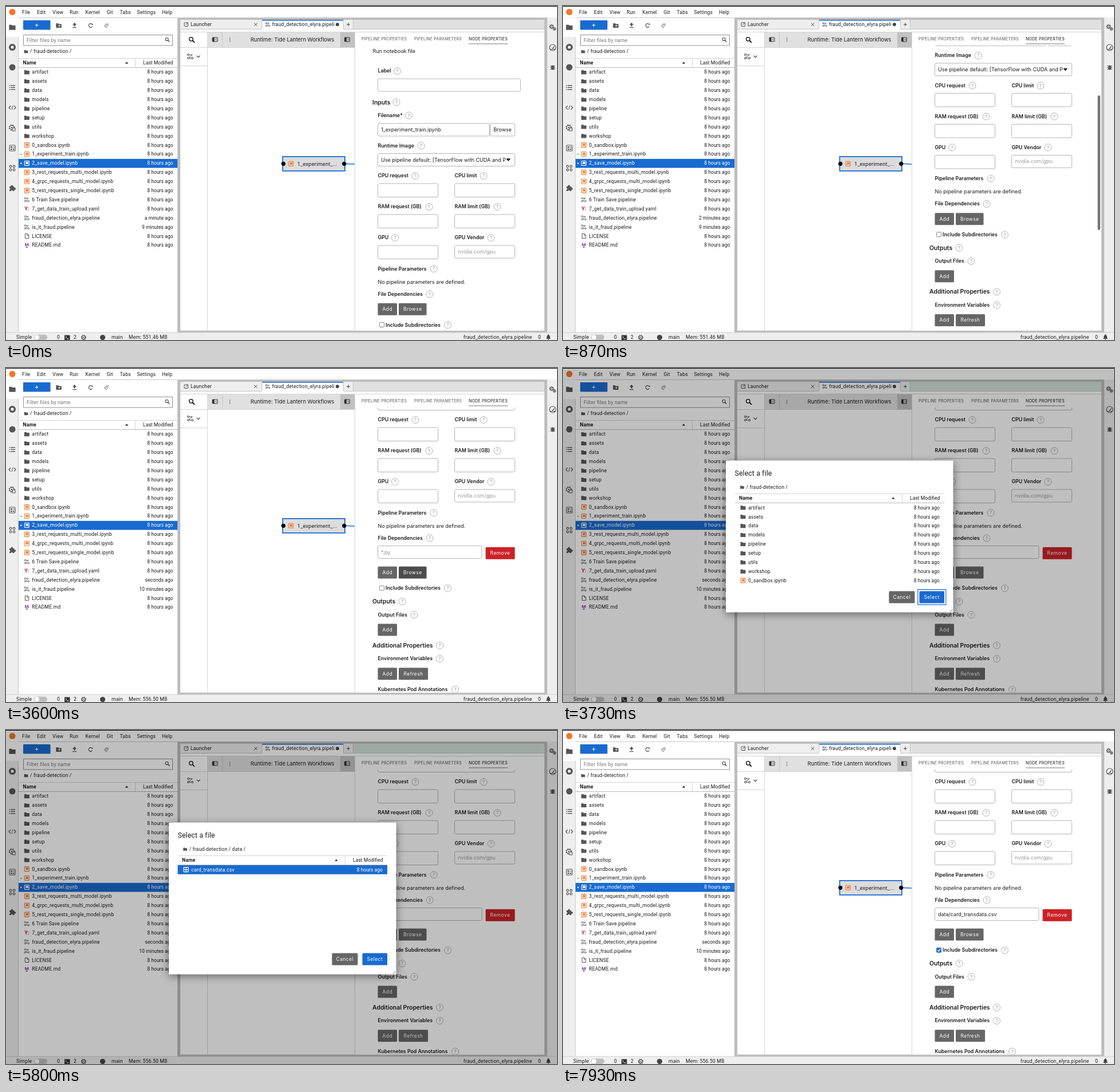
Write an HTML page with a canvas that moves like this. It is 961 px wide and 583 px high and loops after 8 s.

```html
<!DOCTYPE html>
<html lang="en">
<head>
<meta charset="utf-8">
<title>Pipeline editor</title>
<style>
html, body { margin: 0; width: 100%; height: 100%; overflow: hidden; background: #fff; }
canvas { display: block; width: 961px; height: 583px; }
</style>
</head>
<body>
<canvas id="stage"></canvas>
<script>
const W = 961, H = 583, LOOP = 8000, ROW = 15.895;
const canvas = document.getElementById('stage');
const c = canvas.getContext('2d');
const dpr = window.devicePixelRatio || 1;
canvas.width = W * dpr;
canvas.height = H * dpr;

const BLUE = '#196bd0', ORANGE = '#f37726', INK = '#1c1c1c', ICON = '#555', LINE = '#d4d4d4';
const GREY = '#666', DARK = '#4c4c4c';
const UI = { size: 8.6, face: 'Roboto', gap: 0.16 };
const DATE = { ...UI, gap: 0, align: 'right' };
const HEAD = { ...UI, weight: 700 };
const FORM = { size: 9, face: 'Inter' };
const LABEL = { size: 8.8, face: 'Inter', weight: 600 };
const TITLE = { size: 10.4, face: 'Inter', weight: 600 };
const TAB = { size: 7, face: 'Inter', gap: 0.23 };
const BTN = { size: 8.4, face: 'Inter', gap: 0.5, align: 'center' };

function text(s, x, y, style = UI, color = INK) {
  c.font = `${style.weight || 400} ${style.size}px ${style.face}, sans-serif`;
  c.letterSpacing = (style.gap || 0) + 'px';
  c.textAlign = style.align || 'left';
  c.fillStyle = color;
  c.fillText(s, x, y + style.size * 0.34);
}
function rect(x, y, w, h, color) {
  c.fillStyle = color;
  c.fillRect(x, y, w, h);
}
function box(x, y, w, h, r, fill, stroke, lw = 1) {
  c.beginPath();
  c.roundRect(x, y, w, h, r);
  if (fill) { c.fillStyle = fill; c.fill(); }
  if (stroke) { c.strokeStyle = stroke; c.lineWidth = lw; c.stroke(); }
}
function line(color, lw, ...p) {
  c.beginPath();
  for (let i = 0; i < p.length; i += 2) c.lineTo(p[i], p[i + 1]);
  c.strokeStyle = color;
  c.lineWidth = lw;
  c.stroke();
}
function poly(color, ...p) {
  c.beginPath();
  for (let i = 0; i < p.length; i += 2) c.lineTo(p[i], p[i + 1]);
  c.fillStyle = color;
  c.fill();
}
function disc(x, y, r, color) {
  c.beginPath();
  c.arc(x, y, r, 0, 7);
  c.fillStyle = color;
  c.fill();
}
function ring(x, y, r, color, lw = 1, from = 0, to = Math.PI * 2) {
  c.beginPath();
  c.arc(x, y, r, from, to);
  c.strokeStyle = color;
  c.lineWidth = lw;
  c.stroke();
}
// Last value whose start time has passed.
function step(t, list) {
  let v = list[0][1];
  for (const [start, value] of list) if (t >= start) v = value;
  return v;
}

// Icons, each centred on x, y
function folder(x, y, k = 1, color = ICON) {
  poly(color, x - 4.5 * k, y - 3.5 * k, x - 1 * k, y - 3.5 * k, x, y - 2.4 * k,
    x + 4.5 * k, y - 2.4 * k, x + 4.5 * k, y + 3.7 * k, x - 4.5 * k, y + 3.7 * k);
}
function notebook(x, y, color = ORANGE) {
  box(x - 4, y - 4, 8, 8, 0.8, null, color, 1.1);
  poly(color, x - 1.8, y - 2.4, x + 2.4, y - 2.4, x + 2.4, y + 2.6, x + 0.3, y + 0.8, x - 1.8, y + 2.6);
}
function flow(x, y, k = 1, color = ICON) {
  line(color, 0.9, x - 3 * k, y - 2.5 * k, x + 3 * k, y - 2.5 * k, x - 3 * k, y + 2.5 * k, x + 3 * k, y + 2.5 * k);
  for (const [dx, dy] of [[-3, -2.5], [-3, 2.5], [3, 2.5]]) {
    disc(x + dx * k, y + dy * k, 1.6 * k, '#fff');
    ring(x + dx * k, y + dy * k, 1.3 * k, color, 0.9);
  }
}
function page(x, y) {
  c.beginPath();
  for (const [dx, dy] of [[-3, -4], [1, -4], [3.5, -1.5], [3.5, 4], [-3, 4]]) c.lineTo(x + dx, y + dy);
  c.closePath();
  c.strokeStyle = ICON;
  c.lineWidth = 1;
  c.stroke();
  line(ICON, 1, x + 0.8, y - 4, x + 0.8, y - 1.4, x + 3.5, y - 1.4);
}
function yaml(x, y) { text('Y:', x - 4, y, { size: 9, face: 'Roboto', weight: 700 }, '#c2185b'); }
function markdown(x, y) {
  text('M', x - 3.6, y - 1, { size: 8, face: 'Roboto', weight: 700 }, '#7b1fa2');
  poly('#7b1fa2', x - 2, y + 2.6, x + 2, y + 2.6, x, y + 4.8);
}
function table(x, y, color) {
  box(x - 4, y - 4, 8, 8, 0.6, null, color, 1.2);
  line(color, 1.2, x, y - 4, x, y + 4);
  line(color, 1.2, x - 4, y, x + 4, y);
}
function lens(x, y, k, color = INK) {
  ring(x - k, y - k, 2.7 * k, color, 1.1 * k);
  line(color, 1.4 * k, x + k, y + k, x + 4 * k, y + 4 * k);
}
function gear(x, y, r, color = ICON) {
  ring(x, y, r, color, 1.2);
  c.setLineDash([r * 0.4, r * 0.646]);
  ring(x, y, r + 1, color, 1.5);
  c.setLineDash([]);
  disc(x, y, r * 0.35, color);
}
function panelIcon(x, y) {
  box(x - 4.5, y - 3.5, 9, 7, 0.5, null, '#333', 1);
  rect(x - 4.5, y - 3.5, 3.5, 7, '#333');
  line('#333', 0.9, x + 2.8, y - 1.6, x + 1, y, x + 2.8, y + 1.6);
}
function cross(x, y, r, color = '#444') {
  line(color, 1, x - r, y - r, x + r, y + r);
  line(color, 1, x + r, y - r, x - r, y + r);
}
function plus(x, y, r, color) {
  line(color, 1, x - r, y, x + r, y);
  line(color, 1, x, y - r, x, y + r);
}
function puzzle(x, y) {
  rect(x - 5, y - 3, 8.5, 8, ICON);
  disc(x - 0.7, y - 3.6, 1.9, ICON);
  disc(x + 4.2, y + 1, 1.9, ICON);
  disc(x - 5, y + 1, 1.5, '#eee');
  disc(x - 0.7, y + 5, 1.5, '#eee');
}

const DIRS = ['artifact', 'assets', 'data', 'models', 'pipeline', 'setup', 'utils', 'workshop'];
const FILES = [
  ...DIRS.map(name => [name, folder]),
  ...['0_sandbox', '1_experiment_train', '2_save_model', '3_rest_requests_multi_model',
    '4_grpc_requests_multi_model', '5_rest_requests_single_model'].map(name => [name + '.ipynb', notebook]),
  ['6 Train Save.pipeline', flow], ['7_get_data_train_upload.yaml', yaml],
  ['fraud_detection_elyra.pipeline', flow], ['is_it_fraud.pipeline', flow],
  ['LICENSE', page], ['README.md', markdown]
];
const SELECTED = 10;

function menuBar() {
  rect(0, 0, W, H, '#fff');
  const items = { File: 28, Edit: 54, View: 81, Run: 111, Kernel: 138.5, Git: 175.5, Tabs: 198.5, Settings: 228.5, Help: 272 };
  for (const name in items) text(name, items[name], 11.5);
  disc(11, 10.5, 5.5, ORANGE);
  rect(0, 20, W, 1, '#c8c8c8');
  rect(0, 0, W, 1, '#000');
}

function sideBars() {
  rect(0, 20, 22, 550, '#eee');
  rect(0, 21, 22, 33, '#fff');
  rect(21, 54, 1, 516, '#c8c8c8');
  folder(11, 37, 1.25);
  disc(11, 72, 6, ICON);
  rect(8.7, 69.7, 4.6, 4.6, '#fff');
  disc(11, 107, 5.5, ICON);
  for (let i = -1; i < 2; i++) {
    rect(5.5, 141.5 + i * 3.5, 1.5, 1.4, ICON);
    rect(8, 141.5 + i * 3.5, 8, 1.4, ICON);
  }
  line(ICON, 1.2, 8, 174, 5, 177.3, 8, 180.6);
  line(ICON, 1.2, 14, 174, 17, 177.3, 14, 180.6);
  line(ICON, 1, 12, 173.5, 10, 181);
  gear(10, 212, 3.7);
  box(11, 213, 5, 5, 0.5, '#eee', ICON, 1.1);
  box(6, 243, 10, 10, 1, null, ICON, 1.1);
  rect(8, 245, 2.6, 2.6, ICON);
  rect(8, 249, 2.6, 2.2, ICON);
  rect(11.8, 249, 2.6, 2.2, ICON);
  line(ICON, 1, 11.5, 246.3, 15, 246.3);
  for (const dx of [-3, 3]) for (const dy of [-3, 3]) ring(11 + dx, 283 + dy, 1.8, ICON, 1.2);
  puzzle(11, 318);

  rect(944, 20, 17, 550, '#eee');
  gear(951.5, 36, 2.6);
  gear(956.5, 40, 1.6);
  ring(953.5, 72.5, 5.5, ICON, 1.2);
  line(ICON, 1.4, 953, 74.5, 956.5, 70.5);
  line(ICON, 1, 949, 75.5, 958, 75.5);
  box(951, 103.5, 5, 8, 2.5, ICON);
  for (let i = -1; i < 2; i++) line(ICON, 1, 949, 107.5 + i * 2.7, 958, 107.5 + i * 2.7);
}

function listHead(left, right, y, sort, split) {
  rect(left, y - 8, right - left, 1, LINE);
  rect(left, y + 8, right - left, 1, '#bbb');
  rect(split, y - 8, 1, 16, LINE);
  text('Name', left + 7.5, y, HEAD);
  poly(INK, sort - 2.8, y + 1.5, sort + 2.8, y + 1.5, sort, y - 1.5);
  text('Last Modified', right - 7.7, y, DATE);
}

function fileBrowser(t) {
  box(30, 25, 47.5, 16.5, 1, BLUE);
  plus(53.5, 33.5, 2.8, '#fff');
  folder(92, 34, 1.05);
  plus(93, 34.5, 1.7, '#fff');
  poly(ICON, 116, 33, 119.5, 29, 123, 33);
  rect(118.4, 32, 2.4, 3.5, ICON);
  rect(116, 37, 7, 1.2, ICON);
  ring(147.5, 34, 3.3, ICON, 1.2, 0.5, 5.5);
  poly(ICON, 149, 33, 151.6, 33, 151.6, 30.2);
  box(-2.4, -2.4, 0, 0, 0);
  line('#999', 1.1, 171.5, 34.5, 175, 38, 178.5, 33, 175.5, 31, 171.5, 34.5);
  line('#999', 1.1, 173, 36, 178.5, 30);
  box(30.5, 50.5, 260, 18.5, 0, '#fff', '#8f8f8f');
  text('Filter files by name', 36, 60, { ...UI, gap: 0.22 }, '#757575');
  lens(281.5, 59, 0.95, '#444');
  folder(35, 79.5, 0.75);
  text('/ fraud-detection /', 42, 79.5);
  listHead(22, 299, 99, 210.5, 225);

  const dates = {
    16: step(t, [[0, 'a minute ago'], [200, '2 minutes ago'], [1600, 'seconds ago']]),
    17: t < 1600 ? '9 minutes ago' : '10 minutes ago'
  };
  FILES.forEach(([name, icon], i) => {
    const y = 115.5 + i * ROW, on = i === SELECTED;
    if (on) rect(22, y - 7.6, 277, 15.7, BLUE);
    if (i === 9 || on) disc(26.3, y + 0.3, 1.2, on ? '#fff' : '#4caf50');
    if (on) icon(36.3, y, '#fff'); else icon(36.3, y);
    text(name, 45.3, y, UI, on ? '#fff' : INK);
    text(dates[i] || '8 hours ago', 291.5, y, DATE, on ? '#fff' : INK);
  });
}

function editor() {
  const gap = '#bdbdbd';
  rect(299, 21, 645, 549, gap);
  rect(304, 24, 635, 542.5, '#fff');
  rect(304, 24, 635, 16.5, '#e0e0e0');
  rect(304, 24, 142, 16.5, '#eee');
  rect(446, 24, 143, 17, '#fff');
  rect(446, 24, 143, 1.6, BLUE);
  rect(446, 24, 1, 16, '#c4c4c4');
  rect(588, 24, 1, 16, '#c4c4c4');
  rect(589, 24, 16, 16, '#eee');
  rect(605, 24, 1, 16, '#c4c4c4');
  rect(304, 40, 142, 1, '#c4c4c4');
  rect(589, 40, 350, 1, '#c4c4c4');
  box(311, 29, 6.5, 6.5, 0.5, null, ICON);
  line(ICON, 1, 313.5, 33, 317.5, 28.6);
  text('Launcher', 322, 32.3);
  cross(435.5, 32.3, 2.6);
  flow(456.5, 32.3, 0.9);
  text('fraud_detection_elyra.pipeli', 464, 32.3);
  disc(578, 32.3, 3, '#444');
  plus(597, 32.3, 3, '#444');

  rect(304, 45, 635, 1, LINE);
  rect(352, 46, 256, 26, '#e0e0e0');
  rect(377, 46, 1, 26, '#c6c6c6');
  rect(583, 46, 25, 26, '#c2c2c2');
  rect(304, 72, 304, 1, LINE);
  rect(304, 104, 47, 1, LINE);
  rect(351, 46, 1, 520, LINE);
  lens(324, 59, 1.2, '#000');
  flow(321.5, 88, 1.2, '#333');
  line('#333', 1.1, 332.5, 86.6, 335.5, 89.6, 338.5, 86.6);
  panelIcon(364.5, 58.5);
  for (let i = -1; i < 2; i++) disc(390.5, 59 + i * 2.7, 0.7, '#333');
  text('Runtime: Tide Lantern Workflows', 499.5, 59, { size: 9.3, face: 'Inter', align: 'center' });
  panelIcon(595, 58.5);

  line(BLUE, 1.5, 590, 275.3, 608, 276);
  box(482.5, 262.8, 108.5, 25, 0, '#dcdcdc', BLUE, 1.8);
  notebook(497, 275.3);
  text('1_experiment_...', 508, 275.8, { ...UI, size: 9.3 });
  disc(483.8, 275.3, 3.6, '#000');
  disc(589.8, 275.3, 3.6, '#000');
  rect(608, 46, 331, 520.5, '#fff');
  rect(608, 46, 1, 520.5, LINE);
}

function button(s, x, y, w, color = GREY) {
  box(x, y - 10.5, w, 21, 1.5, color);
  text(s, x + w / 2, y, BTN, '#fff');
}
function field(x, y, w, h = 23, value = '', color = INK) {
  box(x + 0.5, y + 0.5, w - 1, h - 1, 2.5, '#fff', '#b4b4b4');
  if (value) text(value, x + 6, y + h / 2, FORM, color);
}
function label(s, x, y, help, style = LABEL) {
  text(s, x, y, style);
  ring(help, y, 6, '#a6a6a6', 0.9);
  text('?', help, y, { size: 8, face: 'Inter', align: 'center' }, '#8c8c8c');
}

function properties(t) {
  text('PIPELINE PROPERTIES', 620, 57.5, TAB, '#555');
  text('PIPELINE PARAMETERS', 712, 57.5, TAB, '#555');
  text('NODE PROPERTIES', 807, 57.5, TAB, '#111');
  rect(807, 65.5, 68, 1, '#777');

  const scroll = step(t, [[0, 0], [130, 6], [200, 20], [270, 26], [530, 40], [600, 75], [670, 110],
    [730, 137], [870, 157.6], [930, 168], [1530, 181], [1600, 196], [1730, 206]]);
  const added = t >= 2270, picked = t >= 6800;
  const hover = step(t, [[0, ''], [1200, 'add'], [1530, ''], [1730, 'browse'], [2000, ''], [2130, 'add'],
    [2270, ''], [3200, 'browse'], [3730, '']]);

  c.save();
  c.beginPath();
  c.rect(609, 69, 330, 497.5);
  c.clip();
  c.translate(0, -scroll);
  text('Run notebook file', 639.5, 78.5, FORM);
  label('Label', 648.5, 113.5, 682.5);
  field(648, 126.5, 250);
  label('Inputs', 639, 168, 681, TITLE);
  label('Filename*', 648.5, 191, 702.5);
  field(648, 204.5, 196, 23, '1_experiment_train.ipynb');
  field(844, 204.5, 44);
  text('Browse', 866, 216, { ...FORM, align: 'center' });
  label('Runtime Image', 648.5, 244, 724);
  field(648, 257, 240, 23, 'Use pipeline default: [TensorFlow with CUDA and P');
  poly('#000', 872.5, 266.3, 880, 266.3, 876.2, 271);
  label('CPU request', 648.5, 296.5, 714);
  label('CPU limit', 782.5, 296.5, 833);
  label('RAM request (GB)', 648.5, 350.5, 738);
  label('RAM limit (GB)', 782.5, 350.5, 857);
  label('GPU', 648.5, 404.5, 678.5);
  label('GPU Vendor', 782.5, 404.5, 846);
  for (const y of [309.5, 363.5, 417.5]) {
    field(648, y, 106, 24.5);
    if (y < 400) field(782, y, 106, 24.5);
  }
  field(782, 417.5, 106, 23, 'nvidia.com/gpu', '#999');
  label('Pipeline Parameters', 648.5, 458.7, 746);
  text('No pipeline parameters are defined.', 648.5, 481.7, FORM);
  label('File Dependencies', 648.5, 503, 739);

  if (added) {
    field(648, 516, 182.5, 23, picked ? 'data/card_transdata.csv' : '*.py', picked ? INK : '#8c8c8c');
    button('Remove', 836.5, 529.3, 51, '#cc2127');
    if (t < 2730 || (t >= 3200 && t < 3470)) rect(654, 522.5, 0.8, 10.5, '#000');
    c.translate(0, 33.8);
  }
  button('Add', 648.5, 529.3, 33.5, hover === 'add' ? DARK : GREY);
  button('Browse', 685, 529.3, 48.5, hover === 'browse' ? DARK : GREY);
  const checked = t >= 7800;
  box(651.6, 552.4, 8, 8, 1.2, checked ? BLUE : '#fff', checked ? BLUE : t >= 7730 ? '#444' : '#777', 0.9);
  if (checked) line('#fff', 1.3, 653.3, 556.6, 655.1, 558.4, 658.2, 554.4);
  label('Include Subdirectories', 662, 556.7, 770.5);
  label('Outputs', 639, 579.7, 691, TITLE);
  label('Output Files', 648.5, 603, 712);
  button('Add', 648.5, 629.3, 33.5);
  label('Additional Properties', 639, 656.5, 756.5, TITLE);
  label('Environment Variables', 648.5, 679.7, 756.5);
  button('Add', 648.5, 706, 33.5);
  button('Refresh', 685, 706, 51);
  label('Kubernetes Pod Annotations', 648.5, 733.3, 783.5);
  button('Add', 648.5, 759.8, 33.5);
  c.restore();

  if (t >= 130 && t < 1270) {
    box(932.5, 81 + scroll * 0.476, 4.5, 235, 2.2, t < 1200 ? '#757575' : '#c4c4c4');
  }
}

function statusBar(t) {
  rect(0, 570, W, 13, '#eee');
  rect(0, 569.5, W, 0.8, '#c8c8c8');
  const y = 578.5;
  text('Simple', 18, y);
  box(49, 573.8, 23, 9, 4.5, '#bdbdbd');
  disc(54, 578.3, 4, '#fff');
  text('0', 89, y);
  rect(102, 574.5, 9.5, 8.5, '#333');
  line('#fff', 0.9, 103.7, 576.5, 105.7, 578.2, 103.7, 580);
  line('#fff', 0.9, 106, 580.8, 109.5, 580.8);
  text('2', 118, y);
  gear(135.5, y, 3, '#444');
  disc(168.5, y, 4.6, '#444');
  text('main', 184, y);
  text(`Mem: ${t < 1600 ? '551.46' : '556.50'} MB`, 214, y);
  text('fraud_detection_elyra.pipeline', 917.5, y, { ...UI, gap: 0.2, align: 'right' });
  text('0', 928, y);
  poly('#444', 942, 581, 943.2, 579.5, 943.2, 576.5, 944.6, 574.6, 947.4, 574.6, 948.8, 576.5, 948.8, 579.5, 950, 581);
  rect(945, 573.3, 2, 1.5, '#444');
  rect(945, 581.6, 2, 1.2, '#444');
}

function dialog(t) {
  rect(0, 1, W, H, 'rgba(0,0,0,0.25)');
  rect(606, 24, 333, 16, '#9eaaa1');
  c.save();
  c.shadowColor = 'rgba(0,0,0,0.45)';
  c.shadowBlur = 14 * dpr;
  c.shadowOffsetY = 3 * dpr;
  rect(284, 161.5, 396.5, 265, '#fff');
  c.restore();
  text('Select a file', 299.5, 184, { ...UI, size: 12.2 });
  const inside = t >= 5270;
  folder(312.5, 208, 0.75);
  text(inside ? '/ fraud-detection / data /' : '/ fraud-detection /', 319.5, 207.7);
  listHead(299.5, 665, 227, 576, 591);

  const names = inside ? ['card_transdata.csv'] : [...DIRS, '0_sandbox.ipynb'];
  const hover = step(t, [[0, -1], [4070, 6], [4130, 3], [4800, 2], [5270, -1], [5600, 0]]);
  const chosen = step(t, [[0, -1], [4930, 2], [5270, -1], [5800, 0]]);
  names.forEach((name, i) => {
    const y = 243.7 + i * ROW, on = i === chosen;
    if (on || i === hover) rect(299.5, y - 7.7, 365.5, 15.8, on ? BLUE : '#ebebeb');
    if (inside) table(314, y, on ? '#fff' : '#388e3c');
    else if (i < DIRS.length) folder(314, y, 1, on ? '#fff' : ICON);
    else notebook(314, y);
    text(name, 323, y, UI, on ? '#fff' : INK);
    text('8 hours ago', 657, y, DATE, on ? '#fff' : INK);
  });

  button('Cancel', 568.5, 400, 45);
  button('Select', 621.5, 400, 43.5, t < 6400 ? BLUE : '#1259b3');
  if (t < 4930 || t >= 6600) box(618.8, 386.7, 49, 26.5, 0, null, BLUE, 1.2);
  line('#777', 0.8, 674.5, 425.5, 679.5, 420.5);
  line('#777', 0.8, 677, 425.5, 679.5, 423);
}

function draw() {
  const t = performance.now() % LOOP;
  c.setTransform(dpr, 0, 0, dpr, 0, 0);
  menuBar();
  sideBars();
  fileBrowser(t);
  editor();
  properties(t);
  statusBar(t);
  if (t >= 3730 && t < 6800) dialog(t);
  requestAnimationFrame(draw);
}
draw();
</script>
</body>
</html>
```
